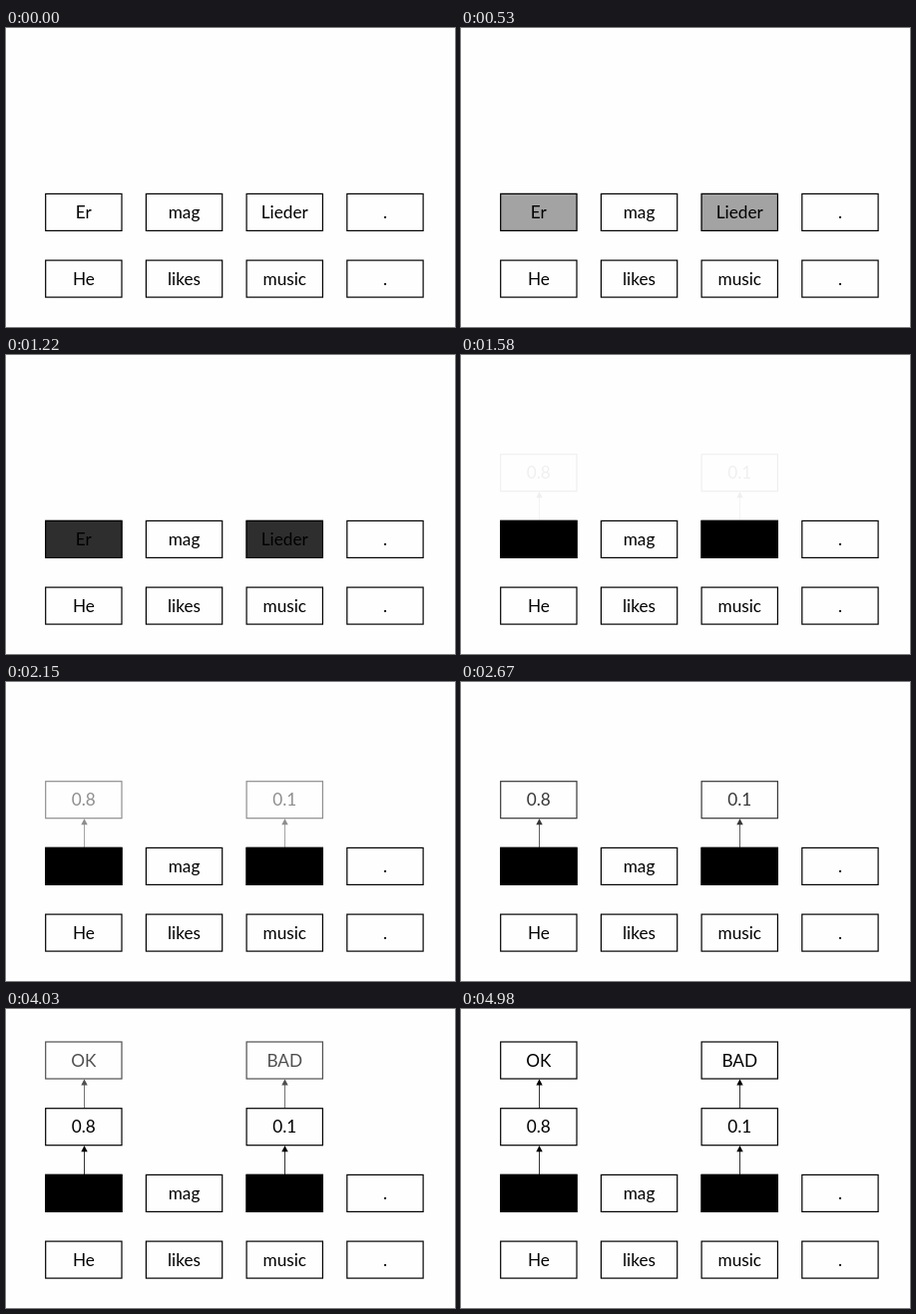
Animation of 450 by 300 pixels, one loop 5.01 s. Source, as an HTML page:

```html
<!DOCTYPE html>
<html lang="en">
<head>
<meta charset="utf-8">
<title>Word scores</title>
<style>
  html, body { margin: 0; width: 100%; height: 100%; overflow: hidden; background: #fefefe; }
  svg { display: block; width: 450px; height: 300px; }
  rect { fill: none; stroke: #000; stroke-width: 1.2; }
  .mask { fill: #000; }
  line { stroke: #000; stroke-width: .8; }
  text { font: 17.2px Carlito, Lato, sans-serif; text-anchor: middle; }
</style>
</head>
<body>
<svg viewBox="0 0 450 300"></svg>
<script>
const LOOP = 5010, STAGE = 1500;
const W = 76.3, H = 37;
const [LABEL, SCORE, WORD, SOURCE] = [33, 99.7, 166.4, 233.1];

const left = col => 39.7 + 100.7 * col;
const middle = col => left(col) + W / 2;

const rect = (col, y, cls = '') =>
  `<rect class="${cls}" x="${left(col)}" y="${y}" width="${W}" height="${H}"/>`;

const box = (col, y, label) =>
  rect(col, y) + `<text x="${middle(col)}" y="${y + 24.7}">${label}</text>`;

// A box with an arrow rising into it from the box below.
function result(col, y, label) {
  const x = Math.round(middle(col)) + .5, tip = y + H + .3;
  return box(col, y, label) +
    `<line x1="${x}" y1="${y + 66.7}" x2="${x}" y2="${tip + 5}"/>` +
    `<path d="M${x} ${tip}l3.2 6.2h-6.4z"/>`;
}

const row = (y, words) => words.map((word, col) => box(col, y, word)).join('');
const stages = [
  rect(0, WORD, 'mask') + rect(2, WORD, 'mask'),
  result(0, SCORE, '0.8') + result(2, SCORE, '0.1'),
  result(0, LABEL, 'OK') + result(2, LABEL, 'BAD')
];

const svg = document.querySelector('svg');
svg.innerHTML = row(WORD, ['Er', 'mag', 'Lieder', '.']) +
  row(SOURCE, ['He', 'likes', 'music', '.']) +
  stages.map(shapes => `<g opacity="0">${shapes}</g>`).join('');
const groups = svg.querySelectorAll('g');

// The stages fade in one after another, then the loop cuts back.
function draw() {
  const t = performance.now() % LOOP;
  groups.forEach((group, i) =>
    group.setAttribute('opacity', Math.min(1, Math.max(0, t / STAGE - i))));
  requestAnimationFrame(draw);
}
draw();
</script>
</body>
</html>
```
